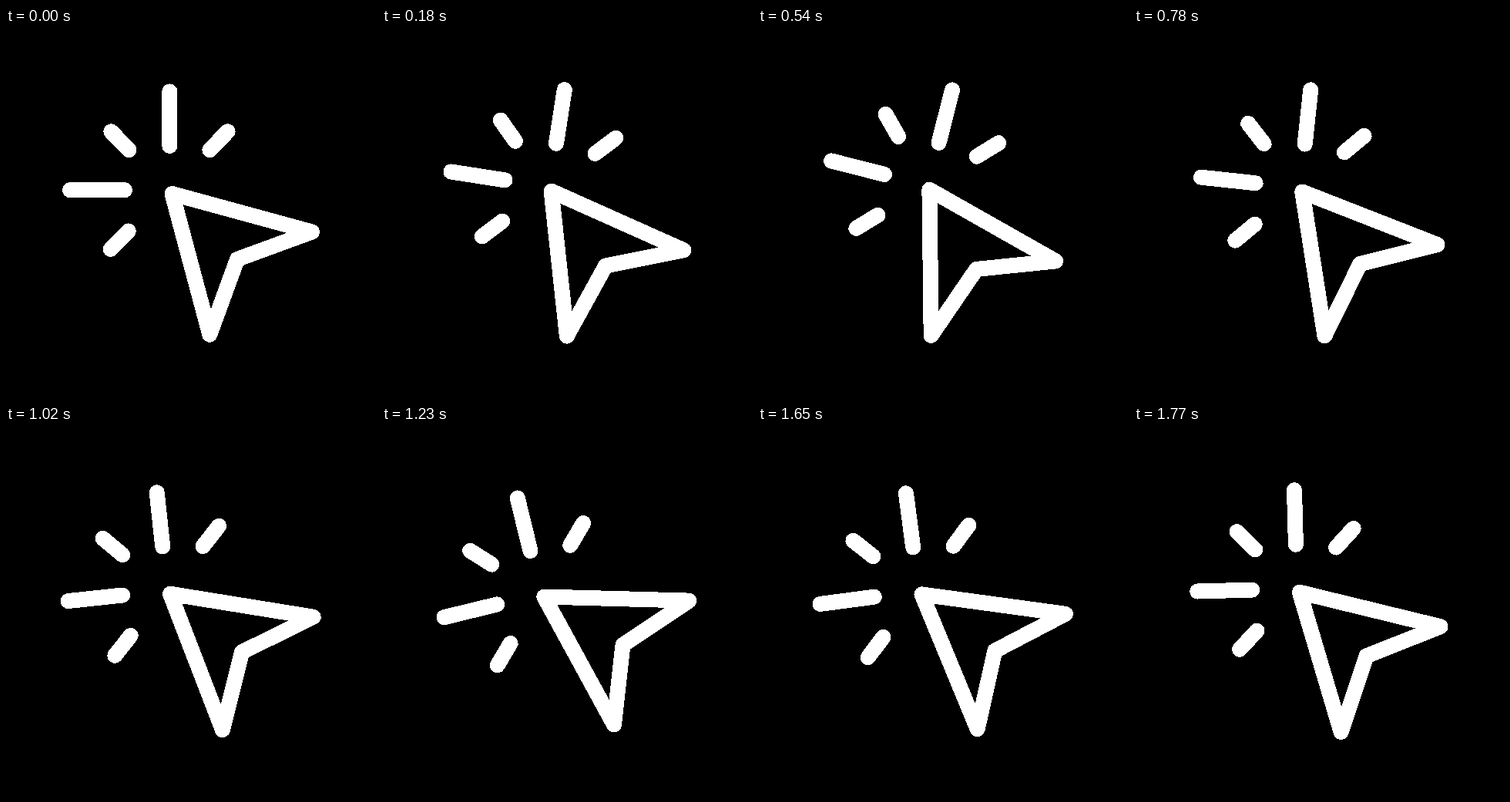
These frames come from a looping animation (480 by 480 pixels, 1800 ms). An HTML page:

```html
<!DOCTYPE html>
<html lang="en">
<head>
<meta charset="utf-8">
<title>Click cursor</title>
<style>
  html, body { margin: 0; width: 100%; height: 100%; overflow: hidden; background: #000; }
  svg { display: block; width: 100vw; height: 100vh; }
</style>
</head>
<body>
<svg viewBox="0 0 480 480" shape-rendering="crispEdges">
  <g id="icon" fill="none" stroke="#fff" stroke-width="20" stroke-linecap="round" stroke-linejoin="round">
    <path d="M212.3 82.4V153M83 210.2H154M136.3 134.2L159.5 158.2M287.6 134.2L264.3 158.2M135.7 287L158.8 263.4"/>
    <path d="M215.5 215L397 264.5L300 300L264.3 397.7Z"/>
  </g>
</svg>
<script>
  const LOOP = 1800, STEP = 30, SWING = 15;
  const icon = document.getElementById('icon');

  function draw(ms) {
    const t = Math.floor((ms % LOOP) / STEP) * STEP;
    const angle = SWING * Math.sin(2 * Math.PI * t / LOOP);
    icon.setAttribute('transform', `rotate(${angle.toFixed(3)} 240 240)`);
  }

  let start;
  function tick(now) {
    start ??= now;
    draw(now - start);
    requestAnimationFrame(tick);
  }
  draw(0);
  requestAnimationFrame(tick);
</script>
</body>
</html>
```
